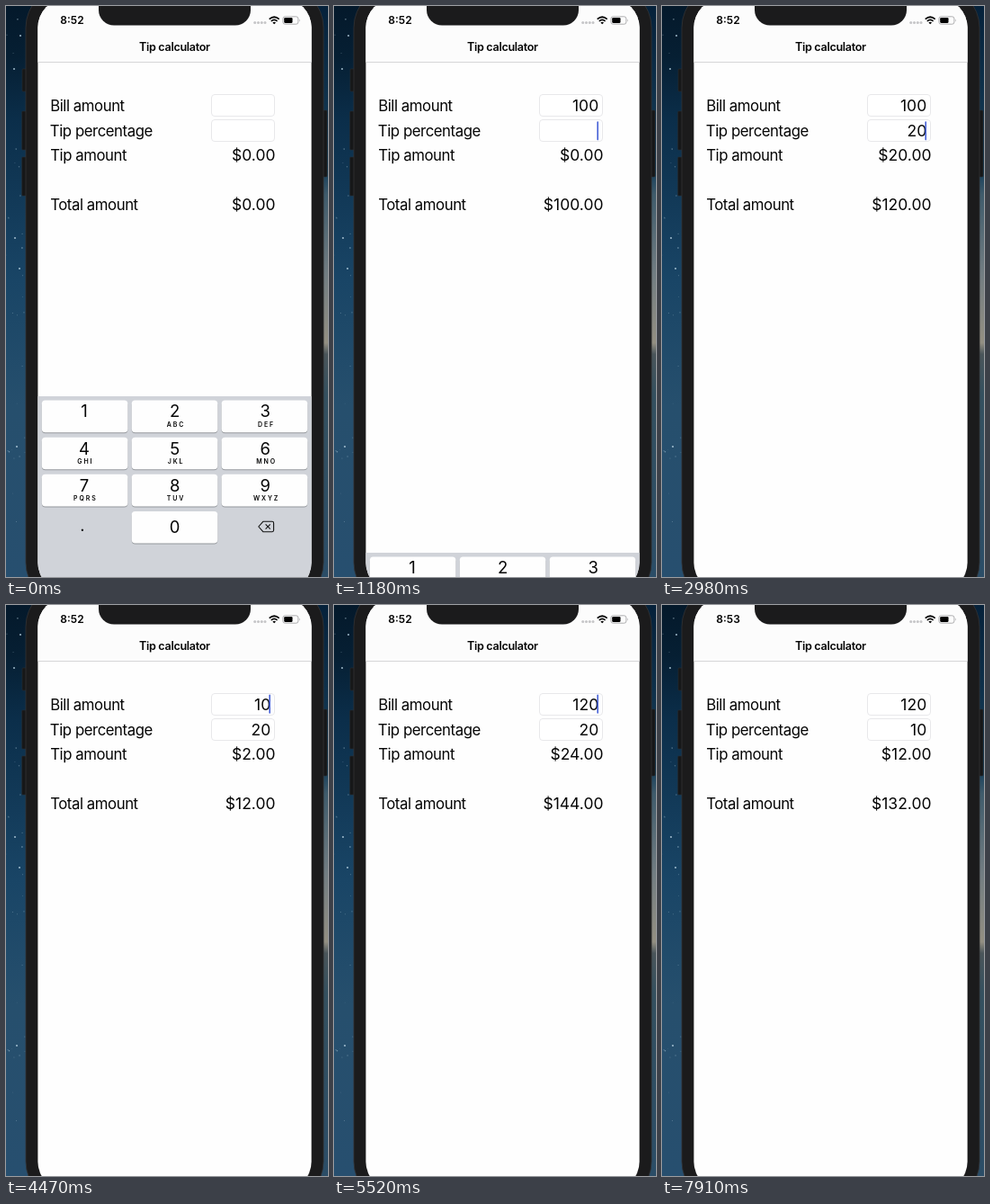
Animation, 358 px wide and 635 px high, one loop 8000 ms. Source, as an HTML page:

```html
<!DOCTYPE html>
<html lang="en">
<head>
<meta charset="utf-8">
<title>Tip calculator</title>
<style>
  html, body { margin: 0; width: 100%; height: 100%; overflow: hidden; background: #0c2c48; }
  svg { display: block; width: 358px; height: 635px; }
  text { font-family: Inter, "Open Sans", sans-serif; fill: #050505; }
  .label { font-size: 16.8px; letter-spacing: -0.45px; }
  .value { font-size: 17.5px; text-anchor: end; }
  .bold { font-weight: 600; }
  .digit { font-size: 18.5px; text-anchor: middle; }
  .letters { font-size: 7px; font-weight: 600; letter-spacing: 1.9px; text-anchor: middle; }
  .field { fill: #fff; stroke: #e8e8ea; }
  .caret { fill: #4560d6; }
</style>
</head>
<body>
<svg viewBox="0 0 358 635">
  <defs>
    <linearGradient id="sky" x2="0" y2="1">
      <stop offset="0" stop-color="#04192b"/>
      <stop offset=".09" stop-color="#061f33"/>
      <stop offset=".2" stop-color="#0b2e4a"/>
      <stop offset=".48" stop-color="#194566"/>
      <stop offset=".7" stop-color="#264f6d"/>
      <stop offset="1" stop-color="#274f6f"/>
    </linearGradient>
    <linearGradient id="side" x2="0" y2="1">
      <stop offset="0" stop-color="#05213a"/>
      <stop offset=".29" stop-color="#173f5a"/>
      <stop offset=".33" stop-color="#3f5b6b"/>
      <stop offset=".47" stop-color="#727d82"/>
      <stop offset=".59" stop-color="#938f82"/>
      <stop offset=".61" stop-color="#4a555a"/>
      <stop offset=".68" stop-color="#34505f"/>
      <stop offset="1" stop-color="#2b4d67"/>
    </linearGradient>
    <clipPath id="screen"><rect x="35.4" y="-8" width="304.2" height="659" rx="32"/></clipPath>
  </defs>

  <rect width="358" height="635" fill="url(#sky)"/>
  <rect x="340" width="18" height="635" fill="url(#side)"/>
  <g id="stars" fill="#b9d3e2"></g>

  <g fill="#161718" stroke="#2a2c2f" stroke-width=".6">
    <rect x="18" y="70" width="6" height="25" rx="1"/>
    <rect x="17.7" y="117" width="6" height="43" rx="1"/>
    <rect x="17.7" y="168" width="6" height="43" rx="1"/>
    <rect x="351" y="116" width="6" height="74" rx="1"/>
  </g>
  <rect x="22" y="-22" width="331" height="687" rx="46" fill="#1b1b1c" stroke="#333436" stroke-width=".8"/>

  <g clip-path="url(#screen)">
    <rect x="35" y="-8" width="306" height="660" fill="#fefefe"/>
    <rect x="35" y="-8" width="306" height="70" fill="#fcfcfc"/>
    <rect x="35" y="62" width="306" height="1" fill="#d6d6d8"/>

    <text id="clock" class="bold" x="60.3" y="20" font-size="12"></text>
    <text class="bold" x="148" y="50.3" font-size="12.6" letter-spacing="-.32">Tip calculator</text>

    <g fill="#c6c6c8">
      <circle cx="276.7" cy="18.5" r="1.5"/><circle cx="280.5" cy="18.5" r="1.5"/>
      <circle cx="284.3" cy="18.5" r="1.5"/><circle cx="288" cy="18.5" r="1.5"/>
    </g>
    <g fill="none" stroke="#050505" stroke-width="1.7">
      <path d="M292.7 14.6Q298.2 9.9 303.7 14.6"/>
      <path d="M294.8 16.9Q298.2 14 301.6 16.9"/>
    </g>
    <path d="M296.4 18.4Q298.2 16.9 300 18.4L298.2 20.3Z"/>
    <rect x="307.9" y="11.8" width="17" height="8.4" rx="2.3" fill="none" stroke="#a5a5a7" stroke-width=".9"/>
    <rect x="309.2" y="13.1" width="9.3" height="5.8" rx="1.1"/>
    <path d="M326 14.5q1.4 1.5 0 3z" fill="#a5a5a7"/>

    <text class="label" x="49.2" y="116.6">Bill amount</text>
    <text class="label" x="48.8" y="145.2">Tip percentage</text>
    <text class="label" x="49.2" y="172.4">Tip amount</text>
    <text class="label" x="49.2" y="227.4">Total amount</text>

    <rect class="field" x="228.5" y="98.5" width="70" height="24" rx="3.5"/>
    <rect class="field" x="228.5" y="126.5" width="70" height="24" rx="3.5"/>
    <text id="bill" class="value" x="294.2" y="116.8"></text>
    <text id="tip" class="value" x="294.2" y="145.4"></text>
    <text id="tipSum" class="value" x="299.5" y="172.4"></text>
    <text id="total" class="value" x="299.5" y="227.4"></text>
    <rect id="billCaret" class="caret" x="292.4" y="99.6" width="1.6" height="21.2" rx=".8"/>
    <rect id="tipCaret" class="caret" x="292.4" y="128.2" width="1.6" height="21.2" rx=".8"/>

    <g id="keyboard">
      <rect x="35" y="434" width="306" height="222" fill="#d0d3d9"/>
      <g id="keys"></g>
      <path d="M280.8 579L285.8 573.3H296Q297.6 573.3 297.6 574.9V583.1Q297.6 584.7 296 584.7H285.8Z
        M288.6 576.4L293.8 581.6M293.8 576.4L288.6 581.6"
        fill="none" stroke="#111" stroke-width="1.1" stroke-linejoin="round"/>
    </g>
  </g>
  <path d="M103 -8V4.5A17 17 0 0 0 120 21.5H255A17 17 0 0 0 272 4.5V-8Z" fill="#1b1b1c"/>
</svg>

<script>
const LOOP = 8000;
const $ = id => document.getElementById(id);

function add(parent, tag, attrs, text = '') {
  const el = document.createElementNS('http://www.w3.org/2000/svg', tag);
  for (const name in attrs) el.setAttribute(name, attrs[name]);
  el.textContent = text;
  parent.append(el);
}

function buildKeys() {
  const letters = ['', 'ABC', 'DEF', 'GHI', 'JKL', 'MNO', 'PQRS', 'TUV', 'WXYZ'];
  const key = (x, y) => {
    add($('keys'), 'rect', { x, y: y + 1, width: 95.6, height: 35.6, rx: 4, fill: '#94979c' });
    add($('keys'), 'rect', { x, y, width: 95.6, height: 35.6, rx: 4, fill: '#fefefe' });
  };
  const label = (cls, x, y, text) => add($('keys'), 'text', { class: cls, x, y }, text);
  letters.forEach((word, i) => {
    const column = i % 3, x = 39.8 + column * 99.9, y = 438.6 + Math.floor(i / 3) * 41.1;
    key(x, y);
    label('digit', x + 47.3 + column * .7, y + 18.8, i + 1);
    label('letters', x + 48.6 + column * .7, y + 29.6, word);
  });
  key(139.7, 561.9);
  label('digit', 187.5, 585.6, '0');
  label('digit', 85, 583.5, '.');
}

function buildStars() {
  const star = (cx, cy, r, opacity) => add($('stars'), 'circle', { cx, cy, r, opacity });
  let seed = 11;
  const rand = () => (seed = seed * 16807 % 2147483647) / 2147483647;
  for (let i = 0; i < 30; i++) {
    star(rand() * 21, rand() * 620, .35 + rand() * .45, .2 + rand() * .45);
  }
  for (const [x, y] of [[16, 33], [9, 70], [10, 258], [15, 292], [12, 490]]) star(x, y, 1.1, .8);
}

// Each step changes part of the state and holds until the next one.
const start = { clock: '8:52', bill: '', tip: '', focus: 'bill', caret: 0, drop: 0 };
const steps = [
  [140, { bill: '1', caret: 1 }],
  [290, { bill: '10' }],
  [440, { bill: '100' }],
  [1040, { caret: .5 }],
  [1180, { focus: 'tip', caret: 1, drop: 174 }],
  [1330, { drop: 230 }],
  [1480, { tip: '2' }],
  [1630, { tip: '20' }],
  [2230, { caret: .5 }],
  [2380, { caret: 0 }],
  [2680, { caret: 1 }],
  [2830, { focus: 'bill' }],
  [2980, { focus: 'tip' }],
  [3580, { caret: .5 }],
  [3720, { caret: 0 }],
  [4020, { focus: 'bill', caret: 1 }],
  [4470, { bill: '10' }],
  [4620, { bill: '1' }],
  [4770, { bill: '' }],
  [5070, { bill: '1' }],
  [5370, { bill: '12' }],
  [5520, { bill: '120' }],
  [6120, { focus: 'tip' }],
  [6560, { clock: '8:53' }],
  [6710, { tip: '2' }],
  [6860, { tip: '' }],
  [7010, { tip: '1' }],
  [7160, { tip: '10' }],
  [7760, { caret: .5 }],
  [7910, { caret: 0 }]
];

const money = n => '$' + n.toFixed(2);

function render(time) {
  const state = { ...start };
  for (const [at, change] of steps) if (time >= at) Object.assign(state, change);

  const bill = Number(state.bill), tipSum = bill * Number(state.tip) / 100;
  $('clock').textContent = state.clock;
  $('bill').textContent = state.bill;
  $('tip').textContent = state.tip;
  $('tipSum').textContent = money(tipSum);
  $('total').textContent = money(bill + tipSum);
  for (const name of ['bill', 'tip']) {
    $(name + 'Caret').setAttribute('opacity', state.focus === name ? state.caret : 0);
  }
  $('keyboard').setAttribute('transform', `translate(0 ${state.drop})`);
}

buildKeys();
buildStars();
render(0);
const begin = performance.now();
(function tick() {
  render((performance.now() - begin) % LOOP);
  requestAnimationFrame(tick);
})();
</script>
</body>
</html>
```
